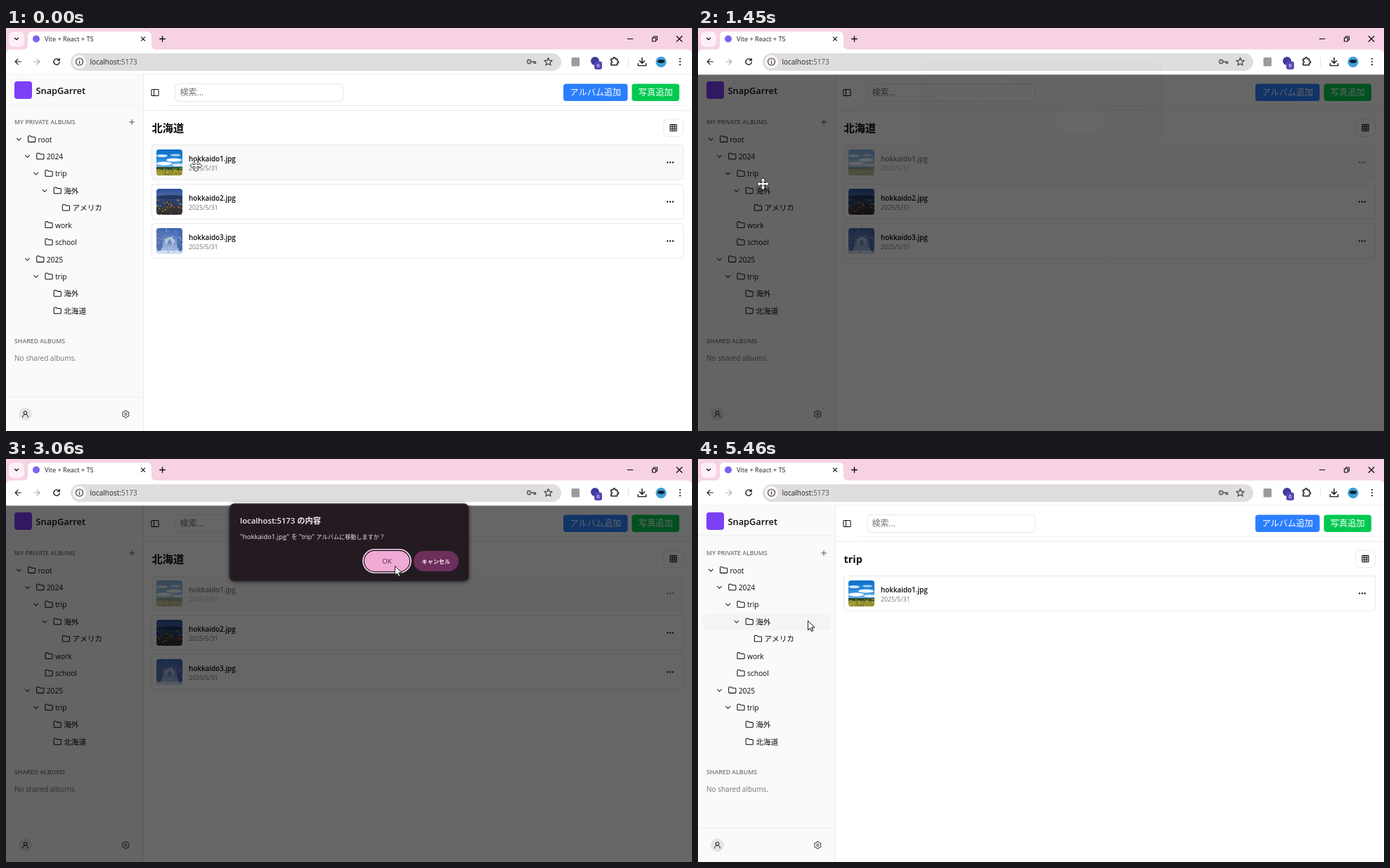
Recreate the animation shown at these times as an HTML page with a canvas. Size 976 by 574 pixels, loop 5590 ms.

```html
<!DOCTYPE html>
<html lang="ja">
<head>
<meta charset="utf-8">
<title>Album app</title>
<style>
html, body { margin: 0; width: 976px; height: 574px; overflow: hidden; background: #fff; }
canvas { display: block; }
</style>
</head>
<body>
<canvas id="stage" width="976" height="574"></canvas>
<script>
const LOOP = 5590;
const FONT = "'Open Sans', 'Noto Sans CJK JP', 'Noto Sans CJK', sans-serif";
const INK = '#0a0a0a', MUTED = '#737373', LINE = '#e8e8e8';
const stage = document.getElementById('stage').getContext('2d');
let g = stage;

// ---------- helpers ----------
function text(str, x, baseline, size, color = INK, weight = 400, align = 'left') {
  g.font = `${weight} ${size}px ${FONT}`;
  g.textAlign = align;
  g.fillStyle = color;
  g.fillText(str, x, baseline);
}

function box(x, y, w, h, r, fill, stroke, width = 1) {
  g.beginPath();
  g.roundRect(x, y, w, h, r);
  if (fill) { g.fillStyle = fill; g.fill(); }
  if (stroke) { g.strokeStyle = stroke; g.lineWidth = width; g.stroke(); }
}

function blob(x, y, rx, ry, fill) {
  g.beginPath();
  g.ellipse(x, y, rx, ry, 0, 0, 7);
  g.fillStyle = fill;
  g.fill();
}

const disc = (x, y, r, fill) => blob(x, y, r, r, fill);

function hline(x1, x2, y, color) {
  g.fillStyle = color;
  g.fillRect(x1, y, x2 - x1, 1);
}

// Strokes a path given on a 24 unit grid, centred on a point.
function icon(path, cx, cy, size = 12.2, color = INK, width = 2) {
  g.save();
  g.translate(cx, cy);
  g.scale(size / 24, size / 24);
  g.translate(-12, -12);
  g.lineWidth = width;
  g.lineCap = g.lineJoin = 'round';
  g.strokeStyle = color;
  g.stroke(path);
  g.restore();
}

function polar(radius, n) {
  const p = new Path2D();
  for (let i = 0; i < n; i++) {
    const a = i / n * Math.PI * 2 - Math.PI / 2, r = radius(i);
    p.lineTo(12 + r * Math.cos(a), 12 + r * Math.sin(a));
  }
  p.closePath();
  return p;
}

function offscreen(w, h, draw) {
  const c = document.createElement('canvas');
  c.width = w;
  c.height = h;
  const previous = g;
  g = c.getContext('2d');
  draw();
  g = previous;
  return c;
}

function random(seed) {
  return () => (seed = (seed * 16807) % 2147483647) / 2147483647;
}

const P = d => new Path2D(d);
const ring = r => `M${12 - r} 12a${r} ${r} 0 1 0 ${2 * r} 0a${r} ${r} 0 1 0 ${-2 * r} 0`;
const icons = {
  chevron: P('M6 9l6 6 6-6'),
  folder: P('M20 20a2 2 0 0 0 2-2V8a2 2 0 0 0-2-2h-8L9.6 3.9A2 2 0 0 0 8 3H4a2 2 0 0 0-2 2v13a2 2 0 0 0 2 2Z'),
  plus: P('M5 12h14M12 5v14'),
  cross: P('M5 5l14 14M19 5L5 19'),
  minus: P('M5 12h14'),
  restore: P('M5 9h10v10H5zM9 9V5h10v10h-4'),
  back: P('M21 12H4M12 4l-8 8 8 8'),
  forward: P('M3 12h17M12 4l8 8-8 8'),
  reload: P('M20 13a8 8 0 1 1-2.3-6.6L20 8.5M20 3v5.5h-5.5'),
  info: P(ring(10) + 'M12 11v6M12 7v.5'),
  key: P('M11 12a4.5 4.5 0 1 0-9 0a4.5 4.5 0 1 0 9 0h11v4h-4v-4M6.5 12h.1'),
  puzzle: P('M4 7h5V5.5a2.5 2.5 0 0 1 5 0V7h5v5h1a2.5 2.5 0 0 1 0 5h-1v5H4v-5a2.5 2.5 0 0 0 0-5z'),
  download: P('M12 2v13M6 10l6 6 6-6M2 17v5h20v-5'),
  panel: P('M4 3h16a2 2 0 0 1 2 2v14a2 2 0 0 1-2 2H4a2 2 0 0 1-2-2V5a2 2 0 0 1 2-2zM9 3v18'),
  grid: P('M4 3h16a1 1 0 0 1 1 1v16a1 1 0 0 1-1 1H4a1 1 0 0 1-1-1V4a1 1 0 0 1 1-1zM3 9h18M3 15h18M9 3v18M15 3v18'),
  user: P('M7 8a5 5 0 1 0 10 0a5 5 0 1 0-10 0M20 21a8 8 0 0 0-16 0'),
  gear: polar(i => 9 + 1.1 * Math.cos(i * Math.PI / 5), 60),
  hub: P(ring(3)),
  star: polar(i => i % 2 ? 4.6 : 10, 10)
};

// ---------- pictures ----------
function backdrop(...colors) {
  const fill = g.createLinearGradient(0, 0, 0, 37);
  colors.forEach((c, i) => fill.addColorStop(i / (colors.length - 1), c));
  box(0, 0, 37, 37, 4, fill);
  g.clip();
}

function specks(seed, n, top, bottom, colors, size) {
  const rnd = random(seed);
  for (let i = 0; i < n; i++) {
    g.fillStyle = colors[i % colors.length];
    g.fillRect(rnd() * 37, top + rnd() * (bottom - top), size * (0.6 + rnd()), size);
  }
}

const photos = [
  () => {
    backdrop('#0a6cc4', '#2484d8', '#6db4ea', '#8cc8f2');
    blob(8, 9, 8, 2, '#cfe6f8');
    blob(27, 8, 7, 1.6, '#a9d2f2');
    blob(25, 15, 11, 2.6, '#f3f9fe');
    blob(11, 20, 11, 2.6, '#ffffff');
    blob(31, 22, 9, 1.8, '#e6f3fd');
    g.fillStyle = '#2c4a2c';
    g.fillRect(0, 25, 37, 4);
    g.fillStyle = '#938f30';
    g.fillRect(0, 29, 37, 8);
    specks(5, 60, 26, 37, ['#d3bd3c', '#4d682c', '#b8a83c'], 1.3);
  },
  () => {
    backdrop('#2c509c', '#46649f', '#253a63', '#3a3534', '#2c2a30');
    blob(20, 12, 20, 3, '#22355c');
    blob(5, 22, 8, 5, '#24406f');
    blob(32, 20, 7, 4, '#24406f');
    specks(11, 70, 15, 37, ['#b9803f', '#6f5030', '#dda552', '#3b3330'], 1.3);
  },
  () => {
    backdrop('#3a62b0', '#5f80c0', '#8fa8d4', '#b4c6e4');
    blob(4, 18, 5, 15, '#5674b2');
    blob(34, 18, 5, 15, '#4a69ac');
    blob(19, 19, 7, 6, '#b5c4de');
    blob(19, 21, 3, 4, '#7288b4');
    blob(18, 36, 24, 4, '#d5e0f0');
    specks(23, 70, 0, 34, ['#c9d7ee', '#45639f', '#8ea6d2'], 1.1);
  }
].map(draw => offscreen(37, 37, draw));

// ---------- browser ----------
function drawBrowser() {
  g.fillStyle = '#f6d2e3';
  g.fillRect(0, 0, 976, 42);
  box(0, 30.5, 976, 40, [7, 7, 0, 0], '#fff');
  box(4, 5, 22, 22, 7, '#fdf0f6');
  icon(icons.chevron, 15, 15.5, 10, INK, 2.8);

  g.fillStyle = '#fff';
  g.fill(P('M24 31q7 0 7-7V12q0-7 7-7H200q7 0 7 7v12q0 7 7 7z'));
  disc(43, 15.5, 5, '#7a62f0');
  text('Vite + React + TS', 55, 19.4, 9.15, '#1f1f1f');
  icon(icons.cross, 195, 15.5, 9, INK, 2.8);
  icon(icons.plus, 222.5, 15.5, 13, INK, 2.4);
  icon(icons.minus, 888, 15.5, 13, INK, 1.9);
  icon(icons.restore, 923, 15.5, 12, INK, 2.2);
  icon(icons.cross, 958, 15.5, 13, INK, 2.2);

  icon(icons.back, 17, 48, 11.5, '#1f1f1f', 2.6);
  icon(icons.forward, 44, 48, 11.5, '#b3abaf', 2.6);
  icon(icons.reload, 72, 48, 12.5, '#1f1f1f', 2.6);
  box(92, 36, 698, 25, 12.5, '#dfdddf');
  disc(104.5, 48, 9.5, '#fbf6f9');
  icon(icons.info, 104.5, 48, 12, '#333', 2.3);
  text('localhost:', 119.5, 51.8, 9.95, '#1f1f1f');
  text('5173', 164, 51.8, 9.95, '#555');
  icon(icons.key, 747.5, 48, 14.5, '#555', 2.2);
  icon(icons.star, 771.5, 48.3, 14, '#444', 2.2);

  box(804.5, 42, 11.5, 12.5, 1.5, '#9b9b9b');
  disc(838, 47, 6, '#3f3a9c');
  box(837, 47.5, 11, 11.5, 3, '#5a45b4');
  text('6', 842.5, 56.2, 8, '#fff', 400, 'center');
  icon(icons.puzzle, 865.5, 47, 14, '#1f1f1f', 2.6);
  g.fillStyle = '#ead9e2';
  g.fillRect(885, 42, 1, 12);
  icon(icons.download, 905, 48, 13.5, '#1f1f1f', 2.6);
  disc(932, 48.3, 7.6, '#3f9fd8');
  blob(932, 47.5, 5, 2.4, '#10202c');
  for (const y of [43.8, 48, 52.2]) disc(959, y, 1.1, '#1f1f1f');
}

// ---------- page ----------
const TREE = [
  ['root', 0, 1], ['2024', 1, 1], ['trip', 2, 1], ['海外', 3, 1], ['アメリカ', 4], ['work', 2],
  ['school', 2], ['2025', 1, 1], ['trip', 2, 1], ['海外', 3], ['北海道', 3]
];
const treeY = i => 158.5 + 24.43 * i;
const rowY = i => 166.5 + 56 * i;

function drawSidebar(hovered) {
  g.fillStyle = '#fafafa';
  g.fillRect(0, 66, 195, 508);
  g.fillStyle = LINE;
  g.fillRect(195, 66, 1, 508);
  hline(0, 195, 108, '#efefef');
  hline(0, 195, 525, '#efefef');
  box(12, 76, 25, 25, 4, '#7b3ff6');
  text('SnapGarret', 42.5, 93.5, 12.8, INK, 600);
  text('MY PRIVATE ALBUMS', 12, 137.2, 8.7, MUTED, 600);
  icon(icons.plus, 179, 134, 12.2, '#555');

  TREE.forEach(([label, level, open], i) => {
    const x = 12.2 * level, y = treeY(i);
    if (i === hovered) box(7, y - 12, 181.5, 24.4, 5, '#f4f4f5');
    if (open) icon(icons.chevron, 18.3 + x, y, 12.2, '#222');
    icon(icons.folder, 36.6 + x, y - 0.2);
    const latin = label.charCodeAt(0) < 128;
    text(label, 45.6 + x, y + 4, latin ? 10.2 : 10.65);
  });

  text('SHARED ALBUMS', 12, 448.7, 8.75, MUTED, 600);
  text('No shared albums.', 12, 474.2, 10, MUTED);
  disc(27.5, 550, 9.4, '#e5e5e5');
  icon(icons.user, 27.5, 550, 11.5);
  icon(icons.gear, 170.3, 550, 12.2, '#444');
  icon(icons.hub, 170.3, 550, 12.2, '#444');
}

function drawRow(photo, index, hovered, faded) {
  const y = rowY(index);
  g.save();
  if (faded) g.globalAlpha = 0.5;
  box(207.5, y, 756.5, 49.5, 4, hovered ? '#f9f9f9' : '#fff', LINE);
  g.drawImage(photos[photo], 214, y + 6.5);
  text(`hokkaido${photo + 1}.jpg`, 260, y + 23.5, 9.85, INK, 600);
  text('2025/5/31', 260, y + 36, 8.75, MUTED);
  for (const dx of [-3.8, 0, 3.8]) disc(945 + dx, y + 25, 1.15, INK);
  g.restore();
}

function drawMain(scene) {
  hline(228, 969, 110, '#f4f4f4');
  hline(196, 976, 117, '#ebebeb');
  icon(icons.panel, 212, 92, 12.2);
  box(241, 79.5, 238.5, 25, 4, '#fff', LINE);
  text('検索...', 247.5, 96.4, 12, MUTED);
  box(793, 79.5, 91.5, 24.5, 4, '#2b7fff');
  text('アルバム追加', 838.8, 96.4, 12.1, '#fff', 400, 'center');
  box(890.5, 79.5, 67.5, 24.5, 4, '#00c950');
  text('写真追加', 924.2, 96.4, 12.2, '#fff', 400, 'center');
  if (scene.album === 'trip') text('trip', 207.5, 148, 14.4, INK, 700);
  else text(scene.album, 207.5, 148.3, 15.25, INK, 700);
  box(935.5, 130, 28, 24.5, 6, '#fff', LINE);
  icon(icons.grid, 949.5, 142.2, 12.2);
  scene.rows.forEach((photo, i) => drawRow(photo, i, i === scene.hoverRow, scene.dragging && i === 0));
}

// ---------- confirm dialog ----------
const makeDialog = focused => offscreen(380, 150, () => {
  g.translate(-300, -45);
  g.shadowColor = 'rgba(0,0,0,.45)';
  g.shadowBlur = 6;
  g.shadowOffsetY = 1;
  box(317.5, 63.5, 341.5, 111, 7.5, '#241b22');
  g.shadowColor = 'transparent';
  box(318, 64, 340.5, 110, 7, null, '#40363d', 0.8);
  text('localhost:5173 の内容', 333, 92.2, 11.3, '#f5e9f0', 600);
  const ink = '#eee2e9';
  text('"hokkaido1.jpg"', 333, 114.3, 9.55, ink);
  text('を', 406, 114.3, 8.6, ink);
  text('"trip"', 417, 114.3, 9.1, ink);
  text('アルバムに移動しますか？', 441.5, 114.3, 8.15, ink);
  if (focused) box(508, 128.8, 68, 33.2, 16.6, null, '#fbdcef', 1.6);
  box(510, 131, 64, 29, 14.5, '#f0aad6');
  text('OK', 542, 149, 9.7, '#5c2049', 400, 'center');
  box(580, 131, 64, 29, 14.5, '#6d2f5b');
  text('キャンセル', 611.8, 148.6, 8.1, '#fbe3f1', 600, 'center');
});
const openDialog = makeDialog(true), closingDialog = makeDialog(false);

function drawDialog(image, alpha, dy) {
  const scale = 1 - dy * 0.001;
  g.save();
  g.globalAlpha = alpha;
  g.translate(488, 119 + dy);
  g.scale(scale, scale);
  g.drawImage(image, -188, -74);
  g.restore();
}

// [time, opacity, vertical offset]
const DIALOG = [[1450, 0.015, -13], [1520, 0.5, -6], [1590, 0.9, -1], [1660, 1, 0], [3260, 0.21, -12.5], [3330, 0, 0]];

// ---------- pointer ----------
const ARROW = P('M0 0V13L3 10.3L5.1 14.8L7.2 13.9L5.2 9.4H9.3Z');
const MOVE = P('M0-8L3-4.6H1V-1H4.6V-3L8 0L4.6 3V1H1V4.6H3L0 8L-3 4.6H-1V1H-4.6V3L-8 0L-4.6-3V-1H-1V-4.6H-3Z');

function drawPointer(x, y, moving) {
  g.save();
  g.translate(x + (moving ? 8.5 : 0.5), y + (moving ? 8 : 0.5));
  const shape = moving ? MOVE : ARROW;
  g.lineJoin = 'round';
  g.lineWidth = moving ? 1.4 : 1;
  g.strokeStyle = '#222';
  g.fillStyle = '#fff';
  g.stroke(shape);
  g.fill(shape);
  if (!moving) g.stroke(shape);
  g.restore();
}

const PATH = [
  [0, 262, 188], [400, 262, 188], [1310, 84, 214], [2380, 84, 214], [2930, 553, 152],
  [3800, 553, 152], [3940, 484, 286], [4270, 481, 289], [4530, 122, 210], [4790, 110, 208],
  [5130, 110, 208], [5460, 156, 230], [LOOP, 156, 230]
];

function pointerAt(t) {
  const i = Math.max(1, PATH.findIndex(p => p[0] > t));
  const [t0, x0, y0] = PATH[i - 1], [t1, x1, y1] = PATH[i];
  const k = (t - t0) / (t1 - t0), e = k * k * (3 - 2 * k);
  return [x0 + (x1 - x0) * e, y0 + (y1 - y0) * e];
}

// ---------- timeline ----------
const run = (start, n) => Array.from({ length: n }, (_, i) => start + 70 * i);
const TICKS = [
  0, ...run(400, 19), 2190, ...run(2450, 6), 2930, 3060, 3130, ...run(3260, 4), 3870, 3940,
  4270, 4400, 4530, 4790, ...run(4990, 3), 5260, 5330, 5460
];

function render(t) {
  const [x, y] = pointerAt(t);
  const modal = t >= 1450 && t < 3260;
  const dragging = t >= 540 && t < 3260;
  const scene = { album: '北海道', rows: [0, 1, 2], dragging, hoverRow: -1 };
  if (t >= 3400) scene.rows = [1, 2];
  if (t >= 5130) Object.assign(scene, { album: 'trip', rows: [0] });

  if (dragging) scene.hoverRow = 0;
  else if (x > 207 && x < 964) {
    scene.hoverRow = scene.rows.findIndex((_, i) => y > rowY(i) && y < rowY(i) + 49.5);
  }
  const hoverTree = !dragging && x < 195 ? Math.round((y - treeY(0)) / 24.43) : -1;
  const moving = dragging ? t >= 1450 && t < 2450 : scene.hoverRow >= 0;

  g.fillStyle = '#fff';
  g.fillRect(0, 0, 976, 574);
  drawBrowser();
  hline(0, 976, 65.5, '#ececec');
  drawSidebar(hoverTree);
  drawMain(scene);
  if (modal) {
    g.fillStyle = 'rgba(0,0,0,.6)';
    g.fillRect(0, 66.5, 976, 508);
  }
  const state = DIALOG.filter(s => s[0] <= t).pop();
  if (state && state[1]) drawDialog(modal ? openDialog : closingDialog, state[1], state[2]);
  drawPointer(x, y, moving);
}

function frame(now) {
  const t = now % LOOP;
  render(TICKS.filter(s => s <= t).pop());
  requestAnimationFrame(frame);
}
render(0);
requestAnimationFrame(frame);
</script>
</body>
</html>
```
